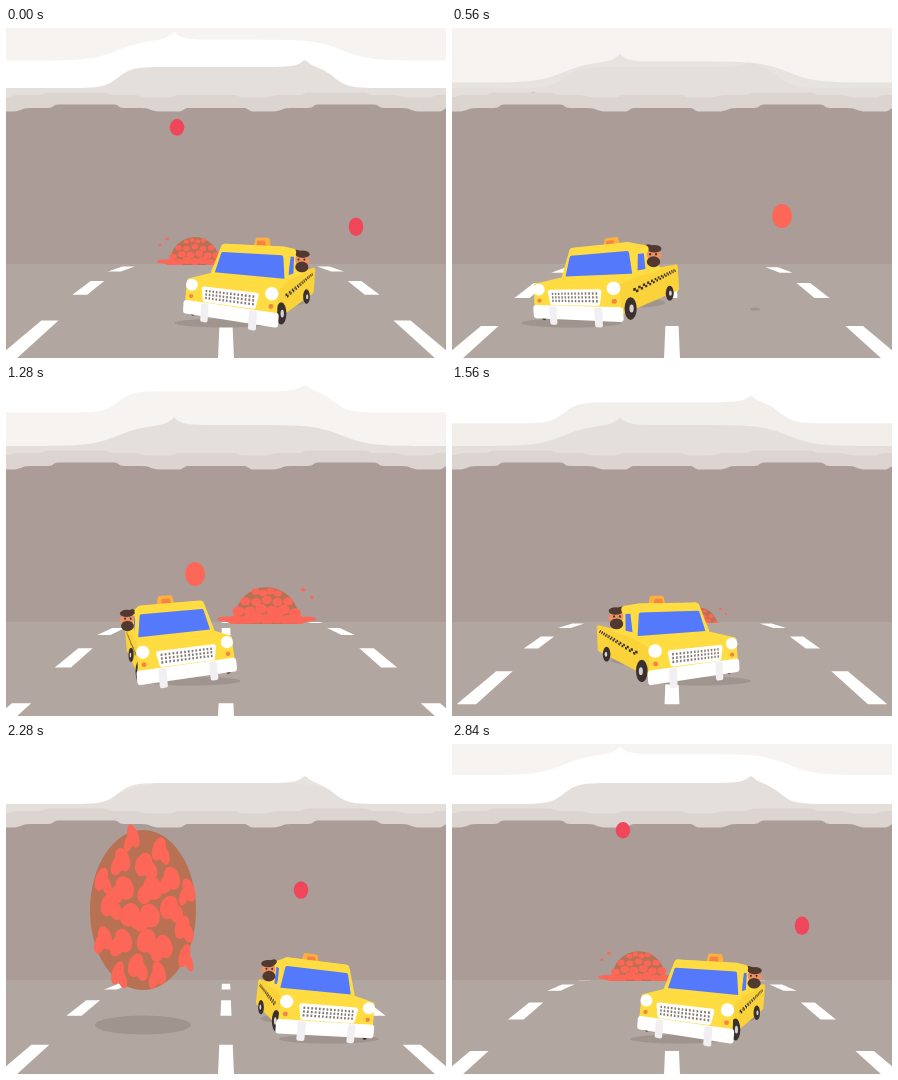
Recreate the animation shown at these times as an HTML page with a canvas. Size 440 px wide and 330 px high, loop 2880 ms.

```html
<!DOCTYPE html>
<html lang="en">
<head>
<meta charset="utf-8">
<title>Taxi and meteors</title>
<style>
  html, body { margin: 0; width: 100%; height: 100%; overflow: hidden; background: #ab9c97; }
  canvas { display: block; width: 440px; height: 330px; }
</style>
</head>
<body>
<canvas id="stage" width="440" height="330"></canvas>
<script>
const ctx = document.getElementById('stage').getContext('2d');
const LOOP = 2880, HALF = LOOP / 2, HORIZON = 236, TAU = Math.PI * 2;
const WALL = '#ab9c97', GROUND = '#b2a6a1', SHADOW = '#a0948f';
const CORAL = '#fd6758', CRIMSON = '#f0465a', BROWN = '#b87152';
const YELLOW = '#ffdd42', SIDE = '#fad23a', BLUE = '#5579fb', ORANGE = '#f78345';
const DARK = '#3a302f', HAIR = '#51392f', SKIN = '#ee9166', WHITE = '#ffffff';

const wrap = (t, span = LOOP) => ((t % span) + span) % span;
const clamp = (v, lo = 0, hi = 1) => Math.min(hi, Math.max(lo, v));
const mix = (a, b, k) => a + (b - a) * k;

function ellipse(color, x, y, rx, ry, angle = 0) {
  ctx.fillStyle = color;
  ctx.beginPath();
  ctx.ellipse(x, y, Math.max(rx, 0), Math.max(ry, 0), angle, 0, TAU);
  ctx.fill();
}

function poly(color, points, round = 0) {
  ctx.beginPath();
  points.forEach(([x, y]) => ctx.lineTo(x, y));
  ctx.closePath();
  ctx.fillStyle = ctx.strokeStyle = color;
  ctx.fill();
  if (round) {
    ctx.lineWidth = round;
    ctx.lineJoin = 'round';
    ctx.stroke();
  }
}

// Clouds fill everything above a lower edge y = edge(x).
function cloud(color, edge) {
  const points = [[440, -90], [0, -90]];
  for (let x = 0; x <= 440; x += 2) points.push([x, edge(x)]);
  poly(color, points);
}

const steps = (x, period, peak) => Math.tanh(-9 * Math.cos((x - peak) / period * TAU));
const terrace = (level, height, peak) => x =>
  level + height * (steps(x, 260, peak) + steps(x, 130, peak));

// A low cloud with a wide arch cut into it and one sharp notch.
const arch = (left, right, soft, notch) => x => {
  const inside = (Math.tanh((x - left) / soft) - Math.tanh((x - right) / soft)) / 2;
  return 60 - 21 * inside - 8 * Math.exp(-Math.abs(x - notch) / 7);
};

function fallingCloud({ tone, edge, age }) {
  const fade = clamp((age - 1950) / 400);
  const shift = -47 * clamp(1 - age / 1200);
  const color = tone.map((c, i) => mix(c, 231 - i * 4, fade));
  cloud(`rgb(${color})`, x => edge(x) + shift);
}

function drawNearClouds(t) {
  const layers = [
    { tone: [255, 255, 255], edge: arch(112, 328, 14, 299), age: wrap(t - 940) },
    { tone: [246, 243, 240], edge: arch(112, 336, 27, 168), age: wrap(t - 940 - HALF) }
  ];
  layers.sort((a, b) => b.age - a.age).forEach(fallingCloud);
}

// Distant meteors: [x, start time]
const CRIMSON_FALLS = [[171, 2010], [350, 1751], [81, 2709], [404, 1053], [295, 1280]];
const CORAL_FALLS = [[189, 295], [330, 2455], [137, 1019]];

function drawFalls(t, falls, color, top, gravity, rx) {
  for (const [x, start] of falls) {
    const y = top + gravity * wrap(t - start) ** 2;
    if (y < HORIZON) ellipse(color, x, y, rx, rx + clamp(y / 190) * 2);
  }
}

// Road marks recede from the viewer; q counts dashes away from the front.
const roadDepth = q => 79.4 * Math.exp(-q) - 5.9;
const laneOffset = dy => 87 + 1.15 * dy + 24 * (1 - Math.exp(-dy / 7));

function drawRoad(t) {
  const phase = wrap(t, 192) / 192;
  for (let n = -2; n < 4; n++) {
    const near = roadDepth(n + phase - .23);
    const far = Math.max(0, roadDepth(n + phase + .24));
    if (near <= 0) continue;
    const mark = (center, half) => poly(WHITE, [
      [center(near) - half(near), HORIZON + near], [center(near) + half(near), HORIZON + near],
      [center(far) + half(far), HORIZON + far], [center(far) - half(far), HORIZON + far]]);
    mark(() => 220, dy => 4 + .042 * dy);
    for (const side of [-1, 1])
      mark(dy => 220 + side * laneOffset(dy), dy => 6 + .045 * dy);
  }
}

function drawBigMeteor(side, age) {
  const x = 220 + side * 83;
  const growth = clamp((age + 310) / 280);
  ellipse(SHADOW, x, 281, 5 + 43 * growth, 1.5 + 8 * growth);
  ctx.save();
  ctx.translate(x, 166 + (age + 30) * 1.05);
  ellipse(BROWN, 0, 0, 53, 80);
  const count = 22;
  for (let i = 0; i < count; i++) {
    const r = Math.sqrt((i + .5) / count), a = i * 2.4 + .5;
    const bx = Math.cos(a) * r * 52, by = Math.sin(a) * r * 78;
    const thin = 1 - .5 * r * r, lean = i % 2 ? 1 : -1;
    ellipse(CORAL, bx, by, 10 * thin, 12, lean * .3);
    ellipse(CORAL, bx + lean * 8 * thin, by + 6, 8 * thin, 10, -lean * .3);
  }
  ctx.restore();
}

function drawHeap(side, age) {
  const scale = Math.exp(-(age - 130) / 600);
  const dy = Math.max(0, 51 * Math.exp(-(age - 10) / 192) - 5.9);
  const sink = 32 * clamp((age - 570) / 250) ** 2;
  const base = HORIZON + dy;
  ctx.save();
  ctx.beginPath();
  ctx.rect(0, 0, 440, base + 1 + Math.min(dy / 2, 12));
  ctx.clip();
  ctx.translate(220 + side * 65 * scale, base + sink);
  ctx.scale(side * scale, scale);

  // splash on the ground
  for (let i = -5; i <= 5; i++)
    ellipse(CORAL, i * 13, -3 + 3 * Math.cos(i * 2), 14, 9 - Math.abs(i));

  // dome, its coral crust shrinking with time
  const lift = 1 + .6 * Math.exp(-age / 40);
  const crust = mix(1.06, .72, clamp((age - 130) / 450));
  ellipse(BROWN, 0, -6 * lift, 51, 50 * lift);
  for (let row = 3; row >= 0; row--) {
    const count = 7 - row, half = 49 * Math.cos(row * .4);
    for (let i = 0; i < count; i++) {
      const size = (13 - row * 1.8) * crust;
      const bx = (i / (count - 1) * 2 - 1) * half;
      const by = -8 - row * 14 + 5 * (bx / 50) ** 2 + (i % 2) * 3;
      ellipse(CORAL, bx, by * lift, size, size * .8);
    }
  }
  const spread = clamp(age / 400);
  ellipse(CORAL, 20 + 38 * spread, -15 - 37 * spread, 4, 2.7, .3);
  ellipse(CORAL, 28 + 44 * spread, -12 - 28 * spread, 3, 2.4, .7);
  ctx.restore();
}

function drawImpacts(t) {
  for (const side of [1, -1]) {
    const impact = side > 0 ? 870 : 870 + HALF;
    const age = wrap(t - impact + 330) - 330;
    if (age < 0) drawBigMeteor(side, age);
    else if (age < 820) drawHeap(side, age);
  }
}

function drawHead(x, y, scale, side) {
  ctx.save();
  ctx.translate(x, y);
  ctx.scale(side * scale, scale);
  ellipse(SKIN, 0, -2, 8, 8);
  ellipse(SKIN, -8, 0, 2, 3);
  ellipse(HAIR, -1, -8.5, 8.5, 4.5);
  ellipse(HAIR, 5, -10, 5, 3.5, -.4);
  ellipse(HAIR, 0, 7, 8, 6.5);
  for (const eye of [-3, 4]) ellipse(DARK, eye, -2, 1.2, 1.4);
  ctx.restore();
}

function drawCar(t) {
  const w = t / LOOP * TAU;
  const frontX = 220 - 104 * Math.sin(w - .015);
  const yaw = Math.cos(w - .807);
  const lean = -.115 * Math.sin(w - .633);
  const side = yaw < 0 ? -1 : 1, turn = Math.abs(yaw);

  // u: across, v: up, d: back from the front bumper
  const scaleAt = (u, d) => 1 / (1 + (d - .25 * u * yaw) / 120);
  const at = (u, v, d = 0) => {
    const s = scaleAt(u, d);
    return [frontX + (u * (1 - .16 * yaw * yaw) + 1.54 * d * yaw + v * lean) * s,
      HORIZON + (52 - v + u * lean) * s];
  };
  // symmetric panel between two edges, each [half width, v, d]
  const panel = (color, [a, va, da = 0], [b, vb, db = 0], round, u = 0) => poly(color,
    [at(u - a, va, da), at(u + a, va, da), at(u + b, vb, db), at(u - b, vb, db)], round);
  // panel on the visible flank, points [d, v]
  const flank = (color, u, points, round) =>
    poly(color, points.map(([d, v]) => at(u * side, v, d)), round);
  const dot = (color, u, v, d, rx, ry = rx) => {
    const s = scaleAt(u, d);
    ellipse(color, ...at(u, v, d), rx * s, ry * s);
  };

  ellipse(SHADOW, frontX - 4 * yaw, 295, 50, 4.5);
  ellipse(SHADOW, ...at(0, -6, 60), 34, 5);

  dot(DARK, -46 * side, 1, 4, 4, 9);
  flank(WHITE, 46, [[96, 15], [96, 6], [88, 6], [88, 15]], 3);
  flank(SIDE, 47, [[1, 33], [19, 39], [95, 45], [95, 7], [2, 4]], 4);
  flank(YELLOW, 42, [[20, 38], [26, 68], [48, 68], [58, 43]], 6);
  if (turn > .08) {
    flank(BLUE, 43, [[26, 42], [28, 64], [36, 64], [37, 43]]);
    const beltAt = d => 24 + (d - 14) * .23, tile = 3;
    for (let i = 0; i < 26; i++) {
      const d = 14 + i * tile, top = beltAt(d) - (i % 2) * 2.8;
      flank(DARK, 48, [[d, top], [d + tile, top], [d + tile, top - 2.8], [d, top - 2.8]]);
    }
    for (const d of [76, 12]) {
      dot(DARK, 46 * side, 4, d, 2.5 + 4 * turn, 11.5);
      dot('#d8d2cf', 47 * side, 4, d, .5 + 1.8 * turn, 4);
    }
  }
  const headU = side * mix(16, 50, clamp((turn - .15) / .25));
  drawHead(...at(headU, 59, 42), scaleAt(headU, 42) * 1.05, -side);

  // roof sign, cabin and windscreen
  panel('#fbb03f', [7, 84, 38], [9, 75, 38], 4);
  panel(ORANGE, [4, 81, 36], [5, 75, 36], 2);
  panel(YELLOW, [33, 70, 50], [36, 70, 24], 8);
  panel(YELLOW, [36, 69, 24], [42, 38, 20], 9);
  panel(BLUE, [36, 62, 22], [40, 39, 20], 4);

  // bonnet, nose and grille
  panel(YELLOW, [42, 36, 19], [46, 31], 5);
  panel(YELLOW, [46, 31], [47, 8], 5);
  panel(WHITE, [28, 24], [26, 13], 5);
  for (let row = 0; row < 3; row++)
    for (let i = -6.5; i < 7; i++)
      panel('#85796f', [.9, 23.5 - row * 3.7], [.9, 21.2 - row * 3.7], 0, i * 3.9);
  for (const u of [-43, 43]) {
    dot(WHITE, u, 27, 0, 6.3);
    dot(ORANGE, u, 15, 0, 2.3);
  }
  panel(WHITE, [48, 7], [48, -1], 6);
  for (const u of [-26, 26]) panel('#f1eff1', [2, 7], [2, -8], 4, u);
}

function draw(t) {
  ctx.fillStyle = WALL;
  ctx.fillRect(0, 0, 440, 330);
  cloud('#dbd4d0', terrace(80, 1.8, 80));
  drawFalls(t, CRIMSON_FALLS, CRIMSON, -46, .000192, 7.3);
  cloud('#e5dfdc', terrace(67, 1.3, 330));
  drawFalls(t, CORAL_FALLS, CORAL, -103, .0003, 10);
  drawNearClouds(t);
  ctx.fillStyle = GROUND;
  ctx.fillRect(0, HORIZON, 440, 94);
  drawRoad(t);
  drawImpacts(t);
  drawCar(t);
}

function tick() {
  draw(wrap(Math.floor(performance.now() / 40) * 40));
  requestAnimationFrame(tick);
}
tick();
</script>
</body>
</html>
```
